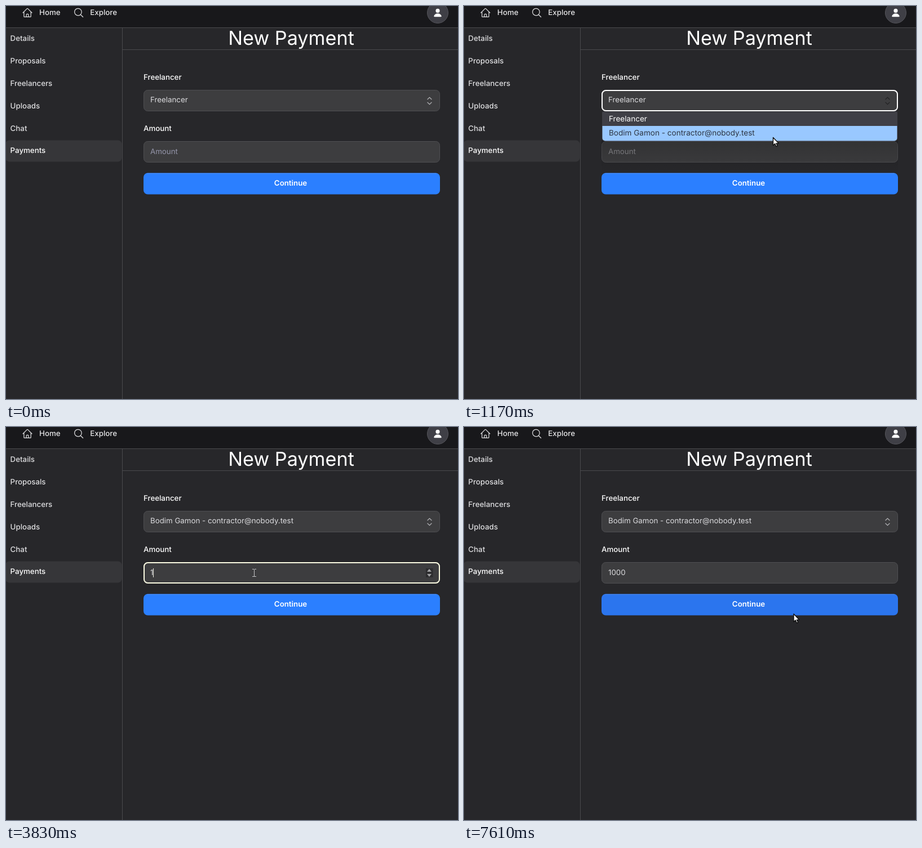
Write an HTML page with a canvas that moves like this. It is 802x698 px and loops after 8000 ms.

```html
<!DOCTYPE html>
<html lang="en">
<head>
<meta charset="utf-8">
<title>New Payment</title>
<style>
  html, body { margin: 0; width: 100%; height: 100%; overflow: hidden; background: #27272a; }
  canvas { position: absolute; left: 0; top: 0; }
  span {
    position: absolute; line-height: 40px; white-space: pre;
    font-family: Inter, "Liberation Sans", sans-serif;
    font-optical-sizing: none; text-rendering: geometricPrecision;
  }
</style>
</head>
<body>
<canvas id="back" width="802" height="698"></canvas>
<div id="labels"></div>
<canvas id="front" width="802" height="698"></canvas>
<script>
const LOOP = 8000;
const PERSON = 'Bodim Gamon - contractor@nobody.test';
const back = document.getElementById('back').getContext('2d');
const front = document.getElementById('front').getContext('2d');
const labels = document.getElementById('labels');

// Text is placed by its left edge (or centre) and its cap-height centre.
function label(text, x, y, { size = 13.3, weight = 400, color = '#dcdcdf', center = false } = {}) {
  const el = document.createElement('span');
  el.textContent = text;
  Object.assign(el.style, {
    left: (center ? x - 200 : x) + 'px', top: y - 20 + 'px',
    fontSize: size + 'px', fontWeight: weight, color
  });
  if (center) Object.assign(el.style, { width: '400px', textAlign: 'center' });
  labels.append(el);
  return el;
}

const show = (el, on) => { el.style.visibility = on ? 'visible' : 'hidden'; };
const setText = (el, s) => { if (el.textContent !== s) el.textContent = s; };

label('Home', 59, 12, { weight: 500, color: '#e6e6e8' });
label('Explore', 149.3, 12, { weight: 500, color: '#e6e6e8' });
['Details', 'Proposals', 'Freelancers', 'Uploads', 'Chat', 'Payments'].forEach((s, i) =>
  label(s, 7.6, Math.floor(58.4 + 39.9 * i), { weight: 500, color: i === 5 ? '#fff' : '#dedee0' }));
label('New Payment', 506, 58, { size: 34.2, color: '#fff', center: true });
label('Freelancer', 244, 127, { weight: 500, color: '#fff' });
const amountLabel = label('Amount', 244, 218, { weight: 500, color: '#fff' });
const choice = label('', 256, 167);
const amount = label('', 256, 259);
label('Continue', 505, 315, { weight: 600, color: '#fff', center: true });
const options = [
  label('Freelancer', 257, 201, { size: 13.55 }),
  label(PERSON, 257, 226, { size: 13.55 })
];

const HOME = new Path2D('m2.25 12 8.954-8.955c.44-.439 1.152-.439 1.591 0L21.75 12M4.5 9.75v10.125c0 .621.504 1.125 1.125 1.125H9.75v-4.875c0-.621.504-1.125 1.125-1.125h2.25c.621 0 1.125.504 1.125 1.125V21h4.125c.621 0 1.125-.504 1.125-1.125V9.75M8.25 21h8.25');
const SEARCH = new Path2D('m21 21-5.2-5.2A7.5 7.5 0 1 0 5.2 5.2a7.5 7.5 0 0 0 10.6 10.6');
const USER = new Path2D('M8 8a3 3 0 1 0 0-6 3 3 0 0 0 0 6ZM12.735 14c.618 0 1.093-.561.872-1.139a6 6 0 0 0-11.215 0c-.22.578.254 1.139.872 1.139h9.47Z');
const ARROW = new Path2D('M0 0V14L3.2 11L5.4 16L7.7 15L5.5 10.4H10Z');
const HAND = new Path2D('M-1.3 1.2Q0 -.6 1.3 1.2V6.6Q2.7 5.8 3.6 7Q5 6.3 5.9 7.6Q8 7 8.3 9V13Q8.2 15 6.8 16.6V18.5H-.6V17Q-2.6 14.8-4.6 11.4Q-5.6 9.4-3.8 9.2Q-2.5 9.3-1.3 11Z');

function rect(x, y, w, h, r, fill, stroke, line = 1) {
  back.beginPath();
  back.roundRect(x, y, w, h, r);
  if (fill) { back.fillStyle = fill; back.fill(); }
  if (stroke) { back.strokeStyle = stroke; back.lineWidth = line; back.stroke(); }
}

function poly(points, color, filled) {
  back.beginPath();
  points.forEach(([x, y]) => back.lineTo(x, y));
  if (filled) { back.fillStyle = color; back.fill(); }
  else { back.strokeStyle = color; back.lineWidth = 1.3; back.stroke(); }
}

function icon(path, cx, cy, scale, box, filled) {
  back.save();
  back.translate(cx, cy);
  back.scale(scale, scale);
  back.translate(-box / 2, -box / 2);
  back.lineCap = back.lineJoin = 'round';
  back.lineWidth = 1.5;
  back.strokeStyle = '#dedee0';
  back.fillStyle = '#fff';
  if (filled) back.fill(path); else back.stroke(path);
  back.restore();
}

function field(y, ring) {
  rect(244.5, y + 0.5, 525, 37, 7, '#3d3d3f', '#4f4f52');
  if (ring) rect(245, y + 1, 524, 36, 6.6, null, ring, 2);
}

// Each move: start, end, steps, target, optional curve control point.
const MOVES = [
  [140, 860, 10, [637, 170], [655, 300]],
  [1010, 1170, 3, [548.5, 233.5]],
  [1250, 1640, 5, [466, 228]],
  [1790, 2010, 4, [451, 255]],
  [2160, 2320, 3, [443, 227]],
  [2470, 2470, 1, [441, 224.5]],
  [2720, 2790, 2, [440, 259]],
  [5260, 5720, 7, [585, 332], [545, 485]]
];
const CLICKS = [[950, 1010], [2470, 2550], [2970, 3040], [5870, 5950]];
const KEYS = [3830, 4220, 4400, 4470];
const CARET_X = [256, 261, 270, 278, 286];

function pointer(t) {
  let p = [745, 730];
  for (const [t0, t1, n, to, via] of MOVES) {
    if (t < t0) break;
    const done = t >= t1 ? n : 1 + Math.floor((t - t0) / (t1 - t0) * (n - 1));
    const u = done / n;
    p = p.map((a, i) => via
      ? (1 - u) ** 2 * a + 2 * u * (1 - u) * via[i] + u * u * to[i]
      : a + (to[i] - a) * u);
  }
  return p;
}

function stateAt(t) {
  const [x, y] = pointer(t);
  const typed = KEYS.filter(k => t >= k).length;
  const focused = t >= 2970 && t < 5870;
  const lastKey = typed ? KEYS[typed - 1] : 2970;
  const overInput = y > 240 && y < 278;
  const open = t >= 950 && t < 2550;
  return {
    t, x, y, typed, focused, open,
    blank: t < 1010,
    chosen: t >= 2550,
    selectRing: t >= 1010 && t < 2970,
    caret: focused && (t - lastKey) % 1040 < 520,
    spinner: focused || (t >= 2550 && t < 2970),
    overInput: overInput && !open,
    overButton: y > 297 && y < 335,
    highlight: t < 1090 ? 0 : 1,
    click: CLICKS.some(([a, b]) => t >= a && t < b)
  };
}

function drawPage() {
  back.fillStyle = '#27272a';
  back.fillRect(0, 0, 802, 698);
  back.fillStyle = '#18181b';
  back.fillRect(0, 0, 802, 38);
  rect(-1, 238.5, 206.5, 38, 7, '#363639');
  back.fillStyle = '#4a4a4d';
  back.fillRect(0, 38, 802, 1);
  back.fillRect(206, 38, 1, 660);
  back.fillRect(206, 77, 596, 1);
  icon(HOME, 38, 12, 0.82, 24);
  icon(SEARCH, 129, 12, 0.84, 24);
  rect(747.5, -6.5, 37, 37, 18.5, '#3f3f46', '#55555b');
  icon(USER, 766, 12, 1.19, 16, true);
}

function drawForm(s) {
  field(149, s.selectRing && '#fff');
  const chevron = s.open ? '#222224' : '#b8b8bb';
  for (const d of [-1, 1])
    poly([[747.6, 168.5 + 2.4 * d], [751.5, 168.5 + 6.2 * d], [755.4, 168.5 + 2.4 * d]], chevron);

  field(240, s.focused && '#fbfbe2');
  if (s.spinner) {
    rect(745, 251, 12.5, 16, 0, '#2d2d2f');
    for (const d of [-1, 1])
      poly([[747, 259 + 2 * d], [751, 259 + 7 * d], [755, 259 + 2 * d]], '#a3a3a5', true);
  }

  rect(244, 296.5, 526, 38, 7.6, s.overButton ? '#2b75ee' : '#2b7fff');
  back.fillStyle = 'rgba(255,255,255,.15)';
  back.fillRect(250, 297, 514, 1);
}

function drawPopup(s) {
  const shade = back.createLinearGradient(0, 239, 0, 296);
  shade.addColorStop(0, 'rgba(0,0,0,.18)');
  shade.addColorStop(1, 'rgba(0,0,0,0)');
  back.fillStyle = shade;
  back.fillRect(244, 239, 526, 57);
  if (s.blank) {
    rect(245.5, 188, 523, 51.5, 5, '#252527', '#4a4a4d');
    return;
  }
  rect(245, 187.5, 524, 52.5, [2, 2, 5, 5], '#3f3f46');
  if (s.highlight) rect(245.5, 213, 523, 26.5, [0, 0, 5, 5], '#99c8ff');
  else rect(245.5, 188, 523, 25, 2, '#99c8ff');
}

function drawText(s) {
  setText(choice, s.chosen ? PERSON : 'Freelancer');
  setText(amount, s.typed ? '1000'.slice(0, s.typed) : 'Amount');
  amount.style.color = s.typed ? '#dcdcdf' : s.open ? '#78787c' : '#9596ab';
  show(amountLabel, !s.open || s.blank);
  options.forEach((el, i) => {
    show(el, s.open && !s.blank);
    el.style.color = s.highlight === i ? '#2d3540' : '#fff';
  });
}

function drawPointer(s) {
  const c = front;
  c.clearRect(0, 0, 802, 698);
  if (s.caret) {
    c.fillStyle = '#f0f0e4';
    c.fillRect(CARET_X[s.typed], 251, 1, 16);
  }
  if (s.t < 140) return;
  if (s.click) {
    c.fillStyle = 'rgba(190,186,30,.75)';
    c.beginPath();
    c.arc(s.x - 0.8, s.y - 0.8, 12.7, 0, 7);
    c.fill();
  }
  c.save();
  if (s.overInput) {
    c.translate(Math.round(s.x), Math.round(s.y));
    c.fillStyle = '#c4c4c6';
    c.fillRect(0, -6, 1, 13);
    for (const y of [-7, 6]) {
      c.fillRect(-3, y, 3, 1);
      c.fillRect(1, y, 3, 1);
    }
  } else {
    const shape = s.overButton && s.t < 7610 ? HAND : ARROW;
    c.translate(s.x, s.y);
    c.lineJoin = 'round';
    c.lineWidth = 1.4;
    c.strokeStyle = '#111';
    c.fillStyle = '#fff';
    c.fill(shape);
    c.stroke(shape);
  }
  c.restore();
}

function frame(now) {
  const s = stateAt((now - start) % LOOP);
  drawPage();
  drawForm(s);
  if (s.open) drawPopup(s);
  drawText(s);
  drawPointer(s);
  requestAnimationFrame(frame);
}

const start = performance.now();
frame(start);
</script>
</body>
</html>
```
